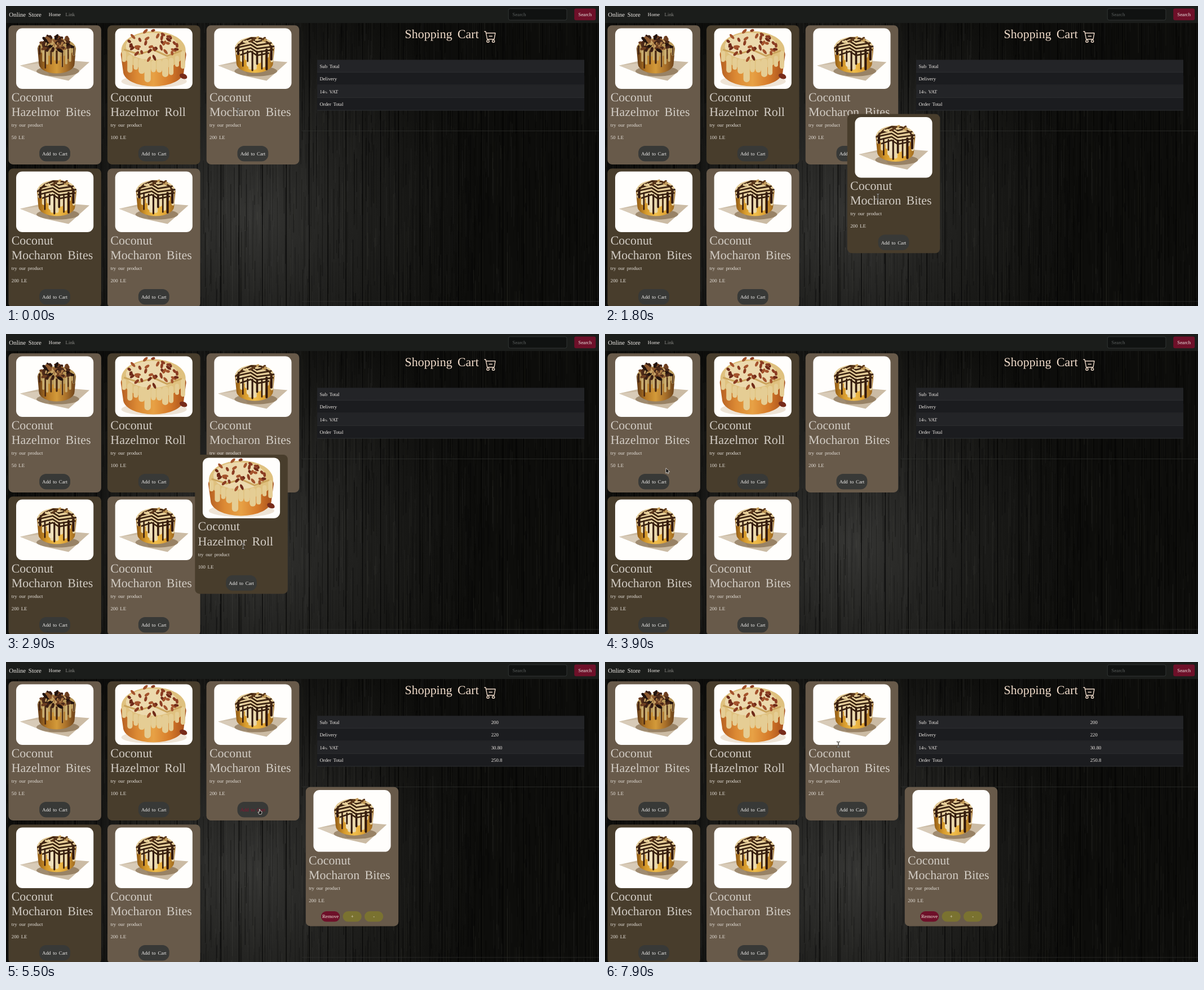
Write an HTML page with a canvas that moves like this. It is 1052 px wide and 532 px high and loops after 8000 ms.

```html
<!DOCTYPE html>
<html lang="en">
<head>
<meta charset="utf-8">
<title>Online Store</title>
<style>
html, body { margin: 0; width: 100%; height: 100%; overflow: hidden; background: #0c0c0a; }
canvas { display: block; width: 1052px; height: 532px; }
</style>
</head>
<body>
<canvas id="stage" width="1052" height="532"></canvas>
<script>
const W = 1052, H = 532, LOOP = 8000, STEP = 100;
const LIGHT = '#685a4a', DARK = '#483d2c', WINE = '#6e1029', OLIVE = '#7a7230';
const SMALL = 8.77, BIG = 21.92, PALE = '#efebe7', PEACH = '#f1dccb';
const canvas = document.getElementById('stage');
let ctx = canvas.getContext('2d');

function random(seed) {
  return () => (seed = (seed * 16807) % 2147483647) / 2147483647;
}

function layer(draw) {
  const c = document.createElement('canvas');
  c.width = W; c.height = H;
  const main = ctx;
  ctx = c.getContext('2d');
  draw();
  ctx = main;
  return c;
}

function text(str, x, y, size = SMALL, color = '#e4dfd8', align = 'left') {
  ctx.font = `${size}px "Liberation Serif", "Times New Roman", serif`;
  ctx.wordSpacing = size * 0.18 + 'px';
  ctx.textRendering = 'geometricPrecision';
  ctx.textAlign = align;
  ctx.fillStyle = color;
  ctx.fillText(str, x, y);
}

function box(x, y, w, h, r, fill, stroke) {
  ctx.beginPath();
  ctx.roundRect(x, y, w, h, r);
  if (fill) { ctx.fillStyle = fill; ctx.fill(); }
  if (stroke) { ctx.strokeStyle = stroke; ctx.lineWidth = 0.8; ctx.stroke(); }
}

function oval(x, y, rx, ry, fill, turn = 0) {
  ctx.beginPath();
  ctx.ellipse(x, y, rx, ry, turn, 0, 7);
  ctx.fillStyle = fill;
  ctx.fill();
}

function poly(points, fill, stroke) {
  ctx.beginPath();
  points.forEach(([x, y]) => ctx.lineTo(x, y));
  ctx.closePath();
  ctx.fillStyle = fill;
  ctx.fill();
  if (stroke) { ctx.strokeStyle = stroke; ctx.lineWidth = 0.9; ctx.stroke(); }
}

function line(points, color, width) {
  ctx.beginPath();
  points.forEach(([x, y]) => ctx.lineTo(x, y));
  ctx.strokeStyle = color;
  ctx.lineWidth = width;
  ctx.lineCap = ctx.lineJoin = 'round';
  ctx.stroke();
}

// ---- cakes, drawn in a 137 x 107 space ----

function bun(cx, top, bottom, rx, ry, colors) {
  const g = ctx.createLinearGradient(cx - rx, 0, cx + rx, 0);
  colors.forEach((c, i) => g.addColorStop(i / (colors.length - 1), c));
  ctx.beginPath();
  ctx.ellipse(cx, top, rx, ry, 0, Math.PI, 0);
  ctx.lineTo(cx + rx * 0.93, bottom);
  ctx.ellipse(cx, bottom, rx * 0.93, ry, 0, 0, Math.PI);
  ctx.closePath();
  ctx.fillStyle = g;
  ctx.fill();
}

function drips(cx, y, rx, ry, n, len, width, color, seed) {
  const rnd = random(seed);
  for (let i = 0; i < n; i++) {
    const u = -0.95 + 1.9 * i / (n - 1);
    const x = cx + u * rx, y0 = y + ry * Math.sqrt(1 - u * u) * 0.8;
    line([[x, y0 - 6], [x, y0 + len * (0.25 + 0.75 * rnd())]], color, width * (0.7 + 0.6 * rnd()));
  }
}

function nuts(n, cx, cy, rx, ry, size, colors, seed) {
  const rnd = random(seed);
  for (let i = 0; i < n; i++) {
    const a = rnd() * 6.28, d = Math.sqrt(rnd());
    oval(cx + Math.cos(a) * d * rx, cy + Math.sin(a) * d * ry,
      size * (0.8 + rnd() * 0.5), size * 0.55, colors[i % colors.length], rnd() * 3);
  }
}

function paper() {
  poly([[7, 66], [38, 59], [70, 55], [130, 60], [93, 93], [52, 84]], '#cbbba4');
  poly([[7, 66], [45, 62], [60, 84], [52, 84]], '#d8cbb8');
  oval(74, 76, 38, 9, 'rgba(90,60,25,.45)');
}

function pecanBites() {
  paper();
  bun(72, 36, 63, 34, 17, ['#5f3714', '#b77a26', '#d39a3a', '#a9702a', '#68401a']);
  oval(72, 34, 33, 16, '#b99858');
  drips(72, 34, 32, 16, 10, 20, 4, '#c9ad70', 71);
  drips(72, 34, 32, 16, 7, 28, 3, '#4a2913', 29);
  nuts(54, 71, 27, 28, 14, 5, ['#3b1f14', '#6b3d20', '#22130d', '#8d5a30', '#4c2a19'], 31);
  nuts(12, 68, 23, 23, 10, 2.6, ['#c9a468', '#a87845'], 5);
}

function pecanRoll() {
  oval(69, 94, 58, 11, '#eee4d6');
  bun(68, 47, 76, 58, 27, ['#b55f22', '#dc8a34', '#e7a145', '#d67b2a', '#a44d1b']);
  oval(68, 39, 57, 34, '#dfc17f');
  drips(68, 42, 55, 31, 11, 25, 9, '#e5cd94', 47);
  oval(65, 32, 46, 24, '#ecd9ad');
  line([[17, 38], [42, 46], [68, 38], [92, 49], [117, 40]], '#cba45c', 3);
  nuts(38, 67, 30, 49, 27, 4.4, ['#8c3d22', '#a4532c', '#6f2a18'], 97);
  oval(121, 85, 7, 4.5, '#772b1a', 0.4);
}

function mochaBites() {
  paper();
  bun(72, 35, 62, 35, 17, ['#8d5714', '#d69a2c', '#f0be4c', '#dfa334', '#94601c']);
  oval(72, 33, 34, 18, '#e4cc98');
  drips(72, 34, 32, 17, 9, 24, 6, '#ead8ab', 19);
  line([[62, 45], [62, 64]], '#efe1bd', 9);
  drips(72, 34, 31, 17, 8, 29, 3.4, '#32190f', 83);
  for (let i = 0; i < 5; i++) {
    const y = 20 + i * 6, d = 20 + Math.sin(i * 0.7) * 14;
    line([[72 - d, y + 3], [65, y - 3], [76, y + 4], [72 + d, y]], '#38200f', 2.6);
  }
  line([[40, 34], [51, 23], [66, 17], [83, 18], [98, 27], [103, 38]], '#452813', 3);
  nuts(9, 72, 21, 20, 7, 3.5, ['#c39b59', '#5c381b', '#e8d09a'], 13);
}

const products = {
  pecan: { title: 'Hazelmor Bites', price: '50 LE', cake: pecanBites },
  roll: { title: 'Hazelmor Roll', price: '100 LE', cake: pecanRoll },
  mocha: { title: 'Mocharon Bites', price: '200 LE', cake: mochaBites }
};

function card(item, x, y, fill, opts = {}) {
  const inCart = opts.inCart, dy = inCart ? 3 : 0, h = inCart ? 109.5 : 107.4;
  box(x, y, 164.5, 246.7, 8, fill);
  ctx.save();
  ctx.translate(x + 13.6, y + 5.4);
  box(0, 0, 137.2, h, 11, '#fffefc');
  ctx.clip();
  ctx.scale(1, h / 107.4);
  item.cake();
  ctx.restore();
  text('Coconut', x + 5.3, y + 134.3 + dy, BIG, '#d2ccc4');
  text(item.title, x + 5.3, y + 160.7 + dy, BIG, '#d2ccc4');
  text('try our product', x + 5.4, y + 179.7 + dy);
  text(item.price, x + 5.4, y + 201.7 + dy);
  if (inCart) {
    pill(x + 27.2, y + 220.3, 'Remove', WINE);
    pill(x + 65.8, y + 220.3, '+', OLIVE);
    pill(x + 104.2, y + 220.3, '-', OLIVE);
  } else {
    box(x + 54.8, y + 213.8, 54.8, 27.5, 12, '#383937');
    text('Add to Cart', x + 82.2, y + 231, SMALL, opts.hover ? '#8c1230' : '#f2f0ee', 'center');
  }
}

function pill(x, y, label, fill) {
  box(x, y, 33.2, 18.6, 9.3, fill);
  text(label, x + 16.6, y + 12.3, SMALL, '#eee6dc', 'center');
}

// ---- page ----

function wood() {
  const rnd = random(4242);
  ctx.fillStyle = '#0d0d0b';
  ctx.fillRect(0, 0, W, H);
  ctx.save();
  ctx.translate(435, 370);
  ctx.scale(1, 1.1);
  const g = ctx.createRadialGradient(0, 0, 0, 0, 0, 400);
  ['#353533', '#252523', '#181816', '#0d0d0b'].forEach((c, i) => g.addColorStop(i / 3, c));
  ctx.fillStyle = g;
  ctx.fillRect(-435, -370, W, H);
  ctx.restore();
  for (let i = 0; i < 3600; i++) {
    const x = rnd() * W, y = rnd() * 640 - 110, len = 15 + rnd() * 130;
    ctx.fillStyle = rnd() < 0.55 ? `rgba(0,0,0,${rnd() * 0.42})` : `rgba(190,190,180,${rnd() * 0.065})`;
    ctx.fillRect(x, y, 0.5 + rnd(), len);
  }
  for (let x = 20; x < W; x += 29 + rnd() * 14) {
    ctx.fillStyle = 'rgba(0,0,0,.65)';
    ctx.fillRect(x, 0, 1.6, H);
    ctx.fillStyle = 'rgba(180,180,170,.045)';
    ctx.fillRect(x + 2, 0, 1, H);
  }
}

function navbar() {
  ctx.fillStyle = '#1b1d1b';
  ctx.fillRect(0, 0, W, 30.2);
  text('Online Store', 5.3, 18.8, BIG / 2, PALE);
  text('Home', 75.8, 18.3, SMALL, PALE);
  text('Link', 105.6, 18.3, SMALL, '#8b8a86');
  box(891.3, 4.8, 103.6, 20.2, 3, '#101211', '#383b3c');
  text('Search', 898.5, 18.3, SMALL, '#5d6160');
  box(1008.2, 4.6, 38, 20.6, 3, WINE);
  text('Search', 1027.2, 18.3, SMALL, PALE, 'center');
}

function cartIcon() {
  ctx.save();
  ctx.translate(848.2, 43.2);
  ctx.scale(1.37, 1.37);
  line([[0.5, 1.5], [2, 1.5], [2.5, 3.5], [14.5, 3.5], [13, 11.5], [4, 11.5], [2.5, 3.5]], PEACH, 1);
  line([[6.5, 7.5], [10.5, 7.5]], PEACH, 1);
  for (const x of [5, 12]) {
    ctx.beginPath();
    ctx.arc(x, 14, 1.5, 0, 7);
    ctx.stroke();
  }
  ctx.restore();
}

const rowY = i => 95.4 + i * 22.47;

function table() {
  ['Sub Total', 'Delivery', '14', 'Order Total'].forEach((label, i) => {
    const y = rowY(i);
    ctx.fillStyle = i % 2 ? '#1b1c1f' : '#232427';
    ctx.fillRect(552, y, 474, 22.47);
    ctx.fillStyle = '#393b3d';
    ctx.fillRect(552, y + 21.9, 474, 0.6);
    text(label, 556.4, y + 14.3, SMALL, PALE);
  });
  text('%', 565.2, rowY(2) + 14.3, 5.6, PALE);
  text('VAT', 573.5, rowY(2) + 14.3, SMALL, PALE);
}

const shelf = ['pecan', 'roll', 'mocha', 'mocha', 'mocha'];
const slot = i => [4.4 + 175.65 * (i % 3), 34.2 + 254 * Math.floor(i / 3)];

const page = layer(() => {
  wood();
  navbar();
  text('Shopping Cart', 707.6, 57, BIG, PEACH);
  cartIcon();
  table();
  ctx.fillStyle = '#30312e';
  ctx.fillRect(525, 221, 527, 0.7);
  ctx.fillRect(525, 523.6, 527, 0.7);
  shelf.forEach((id, i) => card(products[id], ...slot(i), i % 2 ? DARK : LIGHT));
});

// ---- motion: [time, x, y] keys, sampled in 100 ms ticks ----

// The pointer holds a card at its grab point until release; the card then slides home.
const drags = [
  { item: 'mocha', grab: [54.3, 146.5], release: 1800, end: 2200, keys: [
    [1100, 356, 39], [1400, 395, 120], [1700, 434.3, 201], [1800, 429.8, 191.6], [1900, 415, 161], [2100, 364, 49]] },
  { item: 'roll', grab: [85.4, 162.2], release: 3300, end: 3500, keys: [
    [2500, 182, 39], [2900, 335.3, 214], [3100, 348, 228], [3300, 306, 179], [3400, 228, 84]] },
  { item: 'pecan', grab: [101.6, 200.6], release: 4600, end: 5200, keys: [
    [4000, 6, 36], [4400, 261.3, 205.4], [4600, 250, 195], [4900, 40, 52], [5000, 12, 38]] }
];

const rest = [
  [0, 411.5, 186.3], [400, 411.5, 186.3], [500, 411.5, 185.2], [700, 411.5, 185.2], [800, 411.5, 174.5],
  [1800, 484, 338], [2000, 410, 280], [2300, 265, 196], [2400, 265, 196],
  [3300, 391, 341], [3600, 137, 250], [3700, 137, 250], [3900, 108, 238],
  [4600, 352, 396], [5000, 446, 285], [5100, 446, 285], [5300, 449, 261], [5700, 449, 261],
  [5900, 470, 290], [6200, 600, 440], [6400, 631, 459], [6800, 608, 440],
  [7300, 453, 264], [7500, 447, 223], [7900, 414, 146.3]
];

function at(keys, t) {
  let i = 0;
  while (i < keys.length - 2 && keys[i + 1][0] <= t) i++;
  const [t0, x0, y0] = keys[i], [t1, x1, y1] = keys[i + 1];
  const k = Math.min(1, (t - t0) / (t1 - t0));
  return [x0 + (x1 - x0) * k, y0 + (y1 - y0) * k];
}

function pointerAt(t, drag) {
  if (drag && t <= drag.release) {
    const [x, y] = at(drag.keys, t);
    return [x + drag.grab[0], y + drag.grab[1]];
  }
  return t >= 800 && t < 1100 ? rest[4].slice(1) : at(rest, t);
}

function shapeAt(t) {
  if (t >= 5300 && t < 5900 || t === 7300) return 'hand';
  if (t >= 3400 && t < 7300) return 'arrow';
  return 'beam';
}

function beam(x, y) {
  for (const [color, w] of [['#161412', 1.8], ['#d6d2cc', 0.8]]) {
    line([[x, y - 4.2], [x, y + 4.2]], color, w);
    for (const s of [-1, 1]) line([[x - 2, y + 4.8 * s], [x, y + 4.2 * s], [x + 2, y + 4.8 * s]], color, w);
  }
}

function icon(points, x, y) {
  poly(points.map(([a, b]) => [x + a, y + b]), '#0c0c0c', '#dedad5');
}

function arrow(x, y) {
  icon([[0, 0], [0, 9], [2, 7.1], [3.4, 10], [5, 9.2], [3.6, 6.5], [6.3, 6.3]], x, y);
}

function hand(x, y) {
  icon([[0, 0.4], [1.5, 0.4], [1.7, 3], [4.8, 4], [4.8, 7], [3.8, 9], [0, 9], [-2, 5], [0, 5.4]], x, y);
}

function draw(t) {
  ctx.drawImage(page, 0, 0);
  const shape = shapeAt(t);
  if (shape === 'hand') card(products.mocha, ...slot(2), LIGHT, { hover: true });
  if (t >= 5500) {
    card(products.mocha, 531.8, 221.7, LIGHT, { inCart: true });
    ['200', '220', '30.80', '250.8'].forEach((v, i) => text(v, 860.7, rowY(i) + 14.3, SMALL, PALE));
  }
  const drag = drags.find(d => t >= d.keys[0][0] && t < d.end);
  if (drag) card(products[drag.item], ...at(drag.keys, t), DARK);
  ({ beam, arrow, hand })[shape](...pointerAt(t, drag));
}

let last = -1;
const start = performance.now();
function tick(now) {
  const t = Math.floor(Math.max(0, now - start) % LOOP / STEP) * STEP;
  if (t !== last) draw(last = t);
  requestAnimationFrame(tick);
}
draw(0);
requestAnimationFrame(tick);
</script>
</body>
</html>
```
